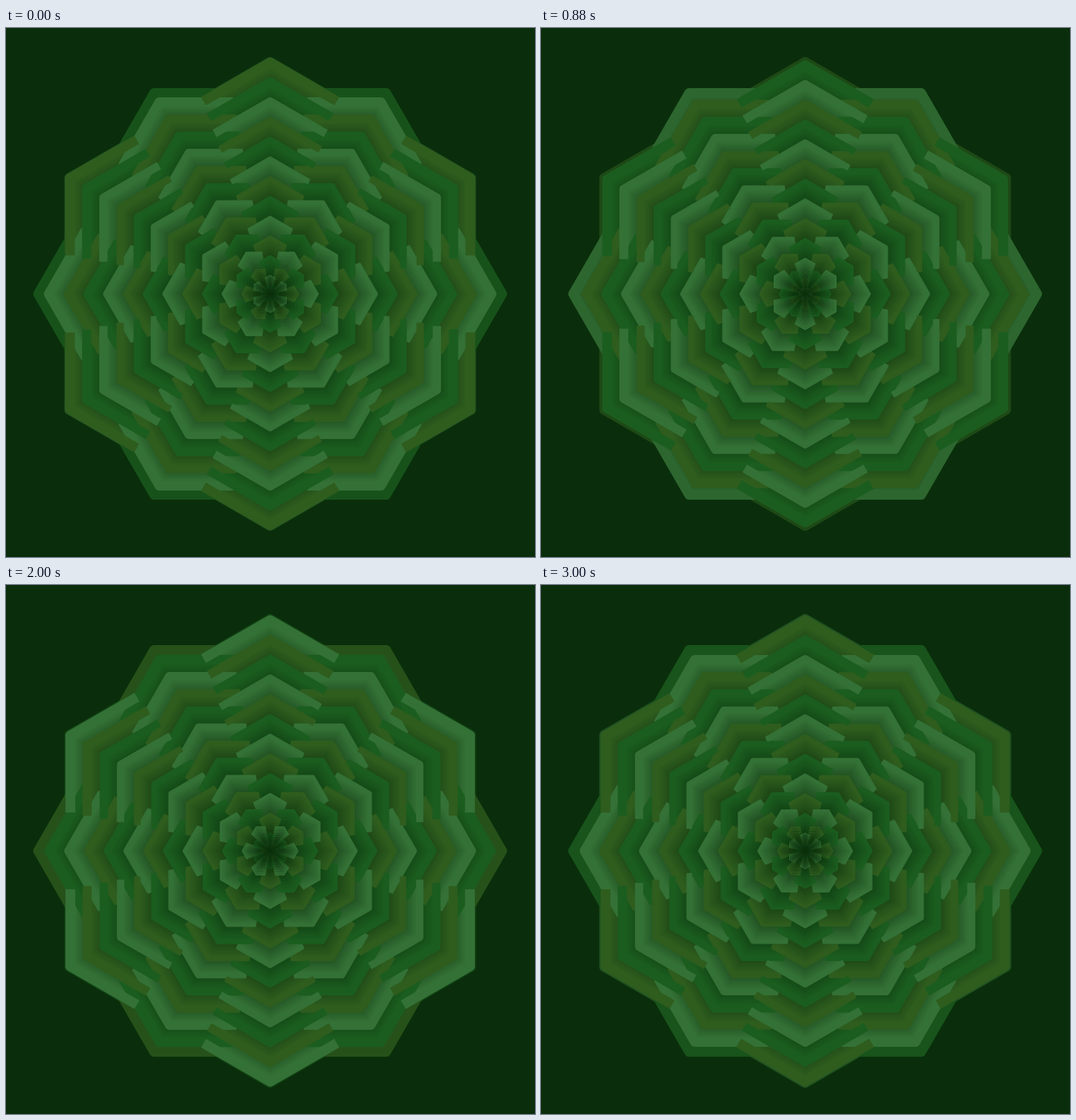
These frames come from a looping animation (748 by 748 pixels, 3.04 s). An HTML page with a canvas:

```html
<!DOCTYPE html>
<html lang="en">
<head>
<meta charset="utf-8">
<title>Green rosette</title>
<style>
  html, body { margin: 0; width: 100%; height: 100%; overflow: hidden; background: #0a2e0b; }
  canvas { display: block; }
</style>
</head>
<body>
<canvas id="stage" width="748" height="748"></canvas>
<script>
const ctx = document.getElementById('stage').getContext('2d');
const LOOP = 3040, STEP = 40;
const CX = 373.5, CY = 376, R = 336;
const GAP = 2, LEVELS = 14, BAND = GAP * LEVELS, PERIOD = BAND * 3;
const STROKE = 14 / R;
const BACK = [10, 46, 11];
const COLORS = [[52, 113, 54], [46, 93, 30], [27, 93, 31]];

// Six chevrons on the corners of a unit hexagon, each arm a third of a side.
function chevrons(turn) {
  const path = new Path2D();
  const r = 1 - STROKE / Math.sqrt(3);
  const corner = i => {
    const a = (turn + i * 60) * Math.PI / 180;
    return [r * Math.cos(a), r * Math.sin(a)];
  };
  const third = (a, b) => a.map((v, i) => v + (b[i] - v) / 3);
  for (let i = 0; i < 6; i++) {
    const tip = corner(i);
    path.moveTo(...third(tip, corner(i - 1)));
    path.lineTo(...tip);
    path.lineTo(...third(tip, corner(i + 1)));
  }
  return path;
}

// Each band dims from its outer edge inwards.
const shades = COLORS.map(color => Array.from({ length: LEVELS }, (_, level) => {
  const k = 1 - 0.55 * level / LEVELS;
  return `rgb(${color.map((v, i) => Math.round(BACK[i] + (v - BACK[i]) * k))})`;
}));

const families = [
  { path: chevrons(0), edge: 279 + PERIOD / 2 },
  { path: chevrons(30), edge: 279 }
];

function drawRing(path, radius, color) {
  ctx.setTransform(radius, 0, 0, radius, CX, CY);
  ctx.strokeStyle = color;
  ctx.stroke(path);
}

function draw(progress) {
  ctx.setTransform(1, 0, 0, 1, 0, 0);
  ctx.fillStyle = `rgb(${BACK})`;
  ctx.fillRect(0, 0, 748, 748);
  ctx.lineWidth = STROKE;
  ctx.lineJoin = 'round';
  ctx.lineCap = 'butt';
  // The brightest level of every band lies on top.
  for (let level = LEVELS - 1; level >= 0; level--) {
    for (const { path, edge } of families) {
      const start = edge + PERIOD * (1 + progress) - level * GAP;
      for (let band = Math.floor(start / BAND); band >= 0; band--) {
        const radius = start - band * BAND;
        if (radius < 1 || radius >= R + GAP) continue;
        drawRing(path, Math.min(radius, R), shades[band % 3][level]);
      }
    }
  }
}

const begin = performance.now();
function tick() {
  const t = (performance.now() - begin) % LOOP;
  draw(Math.floor(t / STEP) * STEP / LOOP);
  requestAnimationFrame(tick);
}
tick();
</script>
</body>
</html>
```
